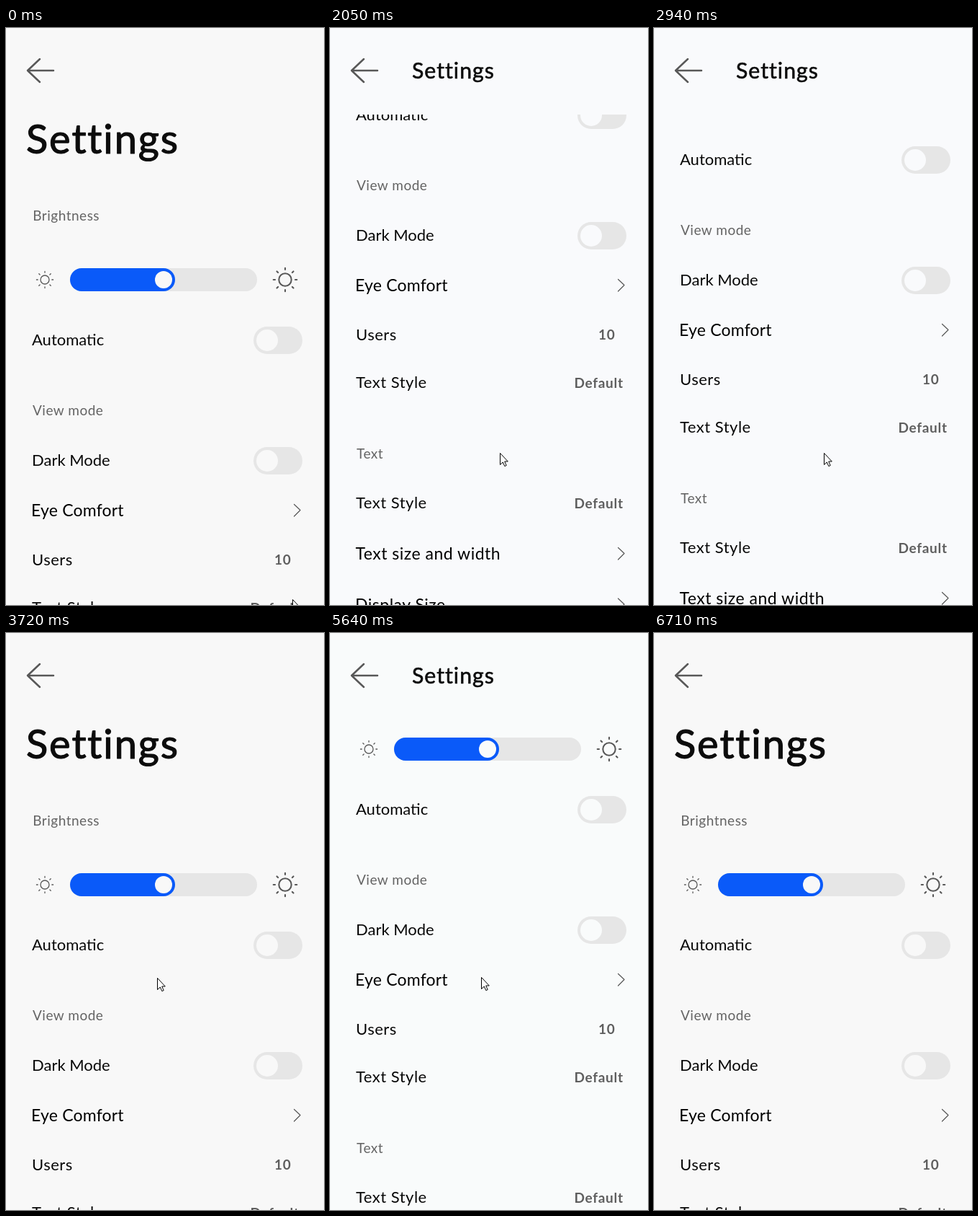
An HTML page for the animation above (7880 ms loop, 442 by 800 pixels).

```html
<!DOCTYPE html>
<html lang="en">
<head>
<meta charset="utf-8">
<title>Settings</title>
<style>
  html, body { margin: 0; width: 100%; height: 100%; overflow: hidden; background: #f8f8f8; }
  svg { display: block; width: 442px; height: 800px; background: var(--bg); --bg: #f8f8f8; }
  text { font-family: Lato, "Open Sans", sans-serif; white-space: pre; }
  .row { font-size: 22px; fill: #080808; }
  .wide { font-size: 23px; letter-spacing: .5px; fill: #000; }
  .spaced { letter-spacing: .5px; }
  .label { font-size: 19px; letter-spacing: .5px; fill: #646464; }
  .value { font-size: 19px; letter-spacing: .7px; font-weight: 700; fill: #5e5e5e; }
  .line { fill: none; stroke: #585858; stroke-linecap: round; stroke-linejoin: round; }
  .track { fill: #e6e6e6; }
  .knob { fill: var(--bg); }
  #title { fill: #0c0c0c; stroke: #0c0c0c; stroke-width: .02em; stroke-linejoin: round; letter-spacing: .034em; }
</style>
</head>
<body>
<svg id="stage" viewBox="0 0 442 800">
  <defs>
    <clipPath id="below"><rect y="120" width="442" height="680"/></clipPath>
    <g id="toggle">
      <rect class="track" x="344" y="-19" width="68" height="38" rx="19"/>
      <circle class="knob" cx="363" r="15"/>
    </g>
    <path id="chevron" class="line" stroke-width="1.2" d="M400.5-8 409-0 400.5 8.5"/>
  </defs>

  <g clip-path="url(#below)">
    <g id="list">
      <text class="label" x="37.3" y="267">Brightness</text>
      <g id="suns" class="line"></g>
      <rect class="track" x="89" y="333" width="260" height="32" rx="16"/>
      <rect fill="#0a5af9" x="89" y="333" width="146" height="32" rx="16"/>
      <circle class="knob" cx="219" cy="349" r="12"/>
      <text class="row" x="36" y="440">Automatic</text>
      <use href="#toggle" y="433"/>

      <text class="label" x="37" y="537">View mode</text>
      <text class="row" x="36" y="607">Dark Mode</text>
      <use href="#toggle" y="600"/>
      <text class="row wide" style="letter-spacing:.2px" x="35" y="677">Eye Comfort</text>
      <use href="#chevron" y="668.5"/>
      <text class="row spaced" x="36" y="745">Users</text>
      <text class="value" x="373" y="744">10</text>
      <text class="row spaced" x="36" y="811">Text Style</text>
      <text class="value" x="339.5" y="811">Default</text>

      <text class="label" x="37" y="909">Text</text>
      <text class="row spaced" x="36" y="978">Text Style</text>
      <text class="value" x="339.5" y="978">Default</text>
      <text class="row wide" x="35.5" y="1049">Text size and width</text>
      <use href="#chevron" y="1040.5"/>
      <text class="row wide" x="35" y="1120">Display Size</text>
      <use href="#chevron" y="1111"/>
    </g>
  </g>

  <path class="line" stroke-width="2.5" d="M66 59H30M47 43 30 59 47 75"/>
  <text id="title">Settings</text>
  <path id="cursor" fill="#fff" stroke="#000" d="M.5.5V16.5L4.3 13 6.8 18.6 9.2 17.5 6.7 12H11.3Z"/>
</svg>

<script>
const LOOP = 7880, NOTCH = 62.5;
const $ = id => document.getElementById(id);
const stage = $('stage'), list = $('list'), title = $('title'), cursor = $('cursor');

function sun(cx, radius, inner, outer, width) {
  let rays = '';
  for (let i = 0; i < 8; i++) {
    const c = Math.cos(i * Math.PI / 4), s = Math.sin(i * Math.PI / 4);
    rays += `M${cx + c * inner} ${349 + s * inner}L${cx + c * outer} ${349 + s * outer}`;
  }
  return `<g stroke-width="${width}"><circle cx="${cx}" cy="349" r="${radius}"/><path d="${rays}"/></g>`;
}
$('suns').innerHTML = sun(54, 6, 9.8, 11.6, 1.3) + sun(388, 8.7, 14, 16.3, 2.1);

// Wheel runs: first time, last time, steps, first notch, direction
const wheel = [
  [1400, 1490, 2, 1, 1], [1680, 1820, 2, 3, 1], [2050, 2260, 4, 5, 1],
  [2730, 2940, 4, 7, -1], [3110, 3300, 4, 3, -1],
  [4050, 4050, 1, 1, 1], [4480, 4480, 1, 2, 1], [4980, 4980, 1, 3, 1], [5220, 5220, 1, 4, 1],
  [5640, 5640, 1, 3, -1], [5800, 5800, 1, 2, -1], [5940, 5940, 1, 1, -1], [6110, 6110, 1, 0, -1]
];

// Pointer runs: first time, last time, steps, start point, end point
const pointer = [
  [30, 440, 10, 398, 792, 237, 589],
  [1750, 1750, 1, 237, 589, 236, 589],
  [3580, 3720, 4, 236, 589, 210, 478],
  [4570, 4570, 1, 210, 478, 210, 477],
  [6430, 6663, 6, 210, 477, 340, 777]
];

const lastRun = (runs, t) => runs.filter(run => run[0] <= t).pop();

function stepsDone(t, [from, to, count]) {
  if (count === 1 || t >= to) return count;
  return 1 + Math.floor((t - from) / (to - from) * (count - 1));
}

function scrollAt(t) {
  const run = lastRun(wheel, t);
  if (!run) return 0;
  const px = (run[3] + (stepsDone(t, run) - 1) * run[4]) * NOTCH;
  return px % 1 ? 2 * Math.round(px / 2) : px;
}

function pointAt(t) {
  const run = lastRun(pointer, t);
  if (!run) return [398, 792];
  const [, , count, x0, y0, x1, y1] = run;
  const p = stepsDone(t, run) / count;
  const k = p * p * (3 - 2 * p);
  return [Math.round(x0 + (x1 - x0) * k), Math.round(y0 + (y1 - y0) * k)];
}

function draw(now) {
  const t = now % LOOP, scroll = scrollAt(t), notches = scroll / NOTCH;
  stage.style.setProperty('--bg', !scroll ? '#f8f8f8' : t < 4000 ? '#f9fafc' : '#f9fbfb');
  list.setAttribute('transform', `translate(0 ${-scroll})`);
  title.style.fontSize = Math.max(30.2, 56 - 9.4 * notches) + 'px';
  title.setAttribute('x', Math.min(114, 28 + 43 * notches));
  title.setAttribute('y', Math.max(70, 174 - 51 * notches));
  const [x, y] = pointAt(t);
  cursor.setAttribute('transform', `translate(${x} ${y})`);
  cursor.style.display = t < 6710 ? '' : 'none';
}

const start = performance.now();
function tick() {
  draw(performance.now() - start);
  requestAnimationFrame(tick);
}
tick();
</script>
</body>
</html>
```
